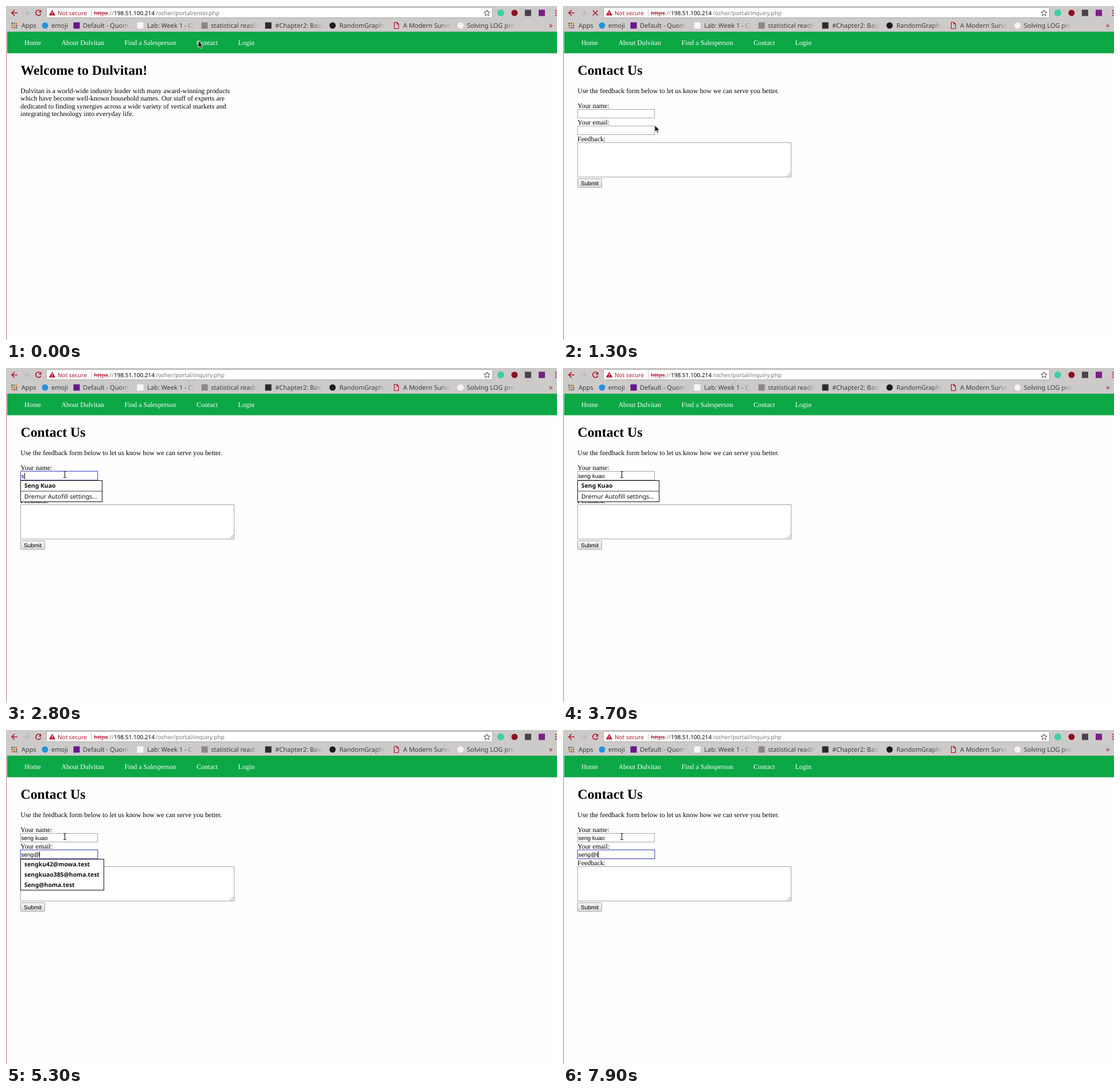
An HTML page that plays this animation: 960x583 px, repeating every 8 s.

```html
<!DOCTYPE html>
<html lang="en">
<head>
<meta charset="utf-8">
<title>Contact form</title>
<style>
  html, body { margin: 0; width: 100%; height: 100%; overflow: hidden; background: #fefefd; }
  svg { display: block; width: 960px; height: 583px; }
  text { white-space: pre; text-rendering: geometricPrecision; }
  .ui { font: 10px "Noto Sans", sans-serif; }
  .mark { font: 11px "Noto Sans", sans-serif; fill: #3c3c3c; }
  .page { font: 11.9px "Liberation Serif", serif; }
  .title { font: bold 23.8px "Liberation Serif", serif; }
  .field { font: 10px "Liberation Sans", sans-serif; }
  .item { font: bold 10.4px "Noto Sans", sans-serif; fill: #111; }
  .plain { font-weight: normal; font-size: 10.5px; }
  .red { fill: #b3142f; }
  .redline { fill: none; stroke: #b3142f; stroke-width: 1.6; }
  .box { fill: #fff; stroke: #a5a5a5; }
</style>
</head>
<body>
<svg id="stage" viewBox="0 0 960 583">
  <defs>
    <linearGradient id="fade"><stop offset="0" stop-color="#cdcbca" stop-opacity="0"/><stop offset="1" stop-color="#cdcbca"/></linearGradient>
    <linearGradient id="button" x2="0" y2="1"><stop offset="0" stop-color="#f6f6f6"/><stop offset="1" stop-color="#dcdcdc"/></linearGradient>
  </defs>
  <rect width="960" height="583" fill="#fefefd"/>

  <g id="home" class="page">
    <text class="title" x="25.5" y="120">Welcome to Dulvitan!</text>
    <text x="25.3" y="152">Dulvitan is a world-wide industry leader with many award-winning products</text>
    <text x="25.3" y="165.3">which have become well-known household names. Our staff of experts are</text>
    <text x="25.3" y="178.7">dedicated to finding synergies across a wide variety of vertical markets and</text>
    <text x="25.3" y="192">integrating technology into everyday life.</text>
  </g>

  <g id="contact" class="page">
    <text class="title" x="25.5" y="120">Contact Us</text>
    <text x="25.3" y="152">Use the feedback form below to let us know how we can serve you better.</text>
    <text x="25.3" y="177.5">Your name:</text>
    <text x="25.3" y="206.5">Your email:</text>
    <text x="25.3" y="235.5">Feedback:</text>
    <rect class="box" x="25.5" y="180.5" width="134" height="15"/>
    <rect class="box" x="25.5" y="209.5" width="134" height="15"/>
    <rect class="box" x="25.5" y="238.5" width="372" height="60"/>
    <path d="M390.5 297.5l6-6M393.5 297.5l3-3" stroke="#777" stroke-width=".8"/>
    <rect x="25.5" y="301.5" width="42" height="15" rx="1" fill="url(#button)" stroke="#a3a3a3"/>
    <text class="field" x="31" y="313">Submit</text>
    <rect id="ring" x="25.3" width="134.4" height="15.4" fill="none" stroke="#686dcc" stroke-width="1.4"/>
    <text id="name" class="field" x="26.5" y="191.5"></text>
    <text id="email" class="field" x="26.5" y="220.5"></text>
    <rect id="caret" width="1" height="11" fill="#000"/>
    <g id="popup"></g>
  </g>

  <rect y="45" width="960" height="37.5" fill="#0ca846"/>
  <g class="page" fill="#fff">
    <text x="32" y="68.3">Home</text>
    <text x="96.5" y="68.3">About Dulvitan</text>
    <text x="206.5" y="68.3">Find a Salesperson</text>
    <text x="332" y="68.3">Contact</text>
    <text x="404.5" y="68.3">Login</text>
  </g>

  <rect width="960" height="45" fill="#cdcbca"/>
  <path d="M0 44.5H960" stroke="#bab8b6"/>
  <path d="M20 12H10.5M15 7l-5 5 5 5" class="redline"/>
  <path d="M30 12h9.5M35 7l5 5-5 5" fill="none" stroke="#b9b7b5" stroke-width="1.6"/>
  <g id="reload"><path d="M60 9a4.6 4.6 0 1 0 .8 4.4" class="redline"/><path d="M61.5 6.5v5h-5z" class="red"/></g>
  <path id="stop" d="M52 8l8.500 8.5M60.5 8L52 16.5" class="redline"/>
  <rect x="70.5" y="2.5" width="777" height="18" rx="2" fill="#fff" stroke="#aaa8a6"/>
  <path d="M80.5 6.5l5.7 10H74.8z" class="red"/>
  <path d="M80.5 9.8v3.4M80.5 14.2v1.2" stroke="#fff" stroke-width="1.2"/>
  <g class="ui">
    <text x="90" y="15.7" class="red">Not secure</text>
    <path d="M148.5 6v12" stroke="#c6c6c6"/>
    <text x="153" y="15.7" class="red">https</text>
    <path d="M153 12.5h24.5" stroke="#b3142f"/>
    <text x="177.5" y="15.7" fill="#777">://</text>
    <text x="188" y="15.7">198.51.100.214</text>
    <text id="path" x="261" y="15.7" fill="#777"></text>
  </g>
  <path d="M838 7l1.5 3.4 3.7.3-2.8 2.4.9 3.7-3.3-2-3.3 2 .9-3.7-2.8-2.4 3.7-.3z" fill="none" stroke="#444"/>
  <circle cx="862" cy="12" r="6" fill="#3ecfa5"/>
  <circle cx="886" cy="12" r="5.5" fill="#8e1020"/>
  <rect x="904" y="6.5" width="11" height="11" fill="#4a434a"/>
  <rect x="928" y="6.5" width="11" height="11" fill="#7a1f86"/>
  <path d="M957 7h2v2h-2zM957 11h2v2h-2zM957 15h2v2h-2z" class="red"/>
  <g id="marks"></g>
  <text x="946" y="37.5" class="mark" style="font-size:13px;fill:#b3142f">»</text>
  <rect y="45" width="1" height="538" fill="#b9788c"/>
  <rect x="1" y="45" width="1" height="37.5" fill="#f6efef"/>

  <g id="status" class="ui">
    <path d="M0 567.5H240q3 0 3 3V583H0z" fill="#e6e4e2" stroke="#b5b3b1"/>
    <text x="4" y="579" fill="#555">https://198.51.100.214/ocher/portal/inquiry.php</text>
  </g>

  <g id="pointer">
    <path id="arrow" d="M0 0V11.5L2.7 9 4.6 13.2 6.6 12.3 4.8 8.2H8.3Z" fill="#111" stroke="#fff" stroke-width=".8"/>
    <path id="hand" d="M-1 0Q0-1.5 1 0V5L6 6Q8 6.5 7.5 9L6.5 13H0L-4 8Q-4 6-1 8Z" fill="#111" stroke="#fff" stroke-width=".8"/>
    <path id="beam" d="M-2.5-5.5H-.8L0-5 .8-5.5H2.5M0-5V5M-2.5 5.5H-.8L0 5 .8 5.5H2.5" fill="none" stroke="#222" stroke-width="1.2"/>
  </g>
</svg>
<script>
const LOOP = 8000;
const $ = id => document.getElementById(id);
const show = (id, on) => $(id).style.display = on ? "" : "none";
const setText = (id, value) => { if ($(id).textContent !== value) $(id).textContent = value; };

// Latest value whose start time has passed.
const at = (steps, t) => steps.reduce((value, [start, next]) => t >= start ? next : value, steps[0][1]);

function between(keys, t) {
  const i = keys.findIndex(key => key[0] > t);
  if (i < 0) return keys[keys.length - 1].slice(1);
  const [t0, x0, y0] = keys[i - 1], [t1, x1, y1] = keys[i];
  const k = (t - t0) / (t1 - t0);
  return [x0 + (x1 - x0) * k, y0 + (y1 - y0) * k];
}

// Bookmark: label, label x, icon centre, icon colour, fade end, round icon.
const bookmarks = [
  ["emoji", 79, 68, "#2393dc", 0, true],
  ["Default - Quomble", 134, 123, "#6a1690", 215],
  ["Lab: Week 1 - Cyc", 246, 234, "#f6f6f6", 327],
  ["statistical readin", 357, 346, "#8a8785", 438],
  ["#Chapter2: Basic", 469, 457, "#2c2a2a", 551],
  ["RandomGraphs", 581, 569, "#1b1a1c", 660, true],
  ["A Modern Survey", 692, 0, "", 773],
  ["Solving LOG prob", 803, 792, "#f6f2f2", 886, true]
];

function drawBookmarks() {
  let out = '<text class="mark" x="27" y="37.8">Apps</text>';
  const dots = ["#c5283d", "#2c9c58", "#d98a1f"];
  for (let i = 0; i < 9; i++) {
    const row = Math.floor(i / 3), column = i % 3;
    out += `<rect x="${9.5 + column * 3.8}" y="${29 + row * 3.8}" width="2.5" height="2.5" fill="${dots[(column + row) % 3]}"/>`;
  }
  for (const [label, x, , , end] of bookmarks) {
    out += `<text class="mark" x="${x}" y="37.8">${label}</text>`;
    if (end) out += `<rect x="${end - 17}" y="25" width="18" height="18" fill="url(#fade)"/><rect x="${end}" y="25" width="30" height="18" fill="#cdcbca"/>`;
  }
  for (const [, , cx, color, , round] of bookmarks)
    if (cx) out += `<rect x="${cx - 5.5}" y="28.5" width="11" height="11" rx="${round ? 5.5 : 0}" fill="${color}"/>`;
  out += '<path d="M676.5 28.5h4.5l3 3v8h-7.5zM681 28.5v3h3" fill="none" stroke="#b3142f" stroke-width="1.2"/>';
  $("marks").innerHTML = out;
}

const mails = ["sengku42@mowa.test", "sengkuao385@homa.test", "Seng@homa.test",
  "sengkuao.study52@homa.test", "sengk.office@mowa.test"];

function frame(x, y, width, height, stroke) {
  return `<rect x="${x}" y="${y}" width="${width}" height="${height}" fill="#fff" stroke="${stroke}"/>`;
}

function mailList(items, width, stroke = "#111") {
  return frame(25.5, 225.5, width, items.length * 18, stroke) +
    items.map((mail, i) => `<text class="item" x="32" y="${238.3 + i * 18}">${mail}</text>`).join("");
}

const nameList = frame(25.5, 196.5, 142, 37, "#111") +
  '<path d="M26 215H167" stroke="#111" stroke-width=".8"/>' +
  '<text class="item" x="32" y="209.3">Seng Kuao</text>' +
  '<text class="item plain" x="32" y="228">Dremur Autofill settings...</text>';

const popups = [
  [0, ""], [2800, nameList], [3800, ""],
  [4700, mailList(mails, 167)], [4900, mailList(mails.slice(0, 3), 145)], [5500, ""],
  [7200, mailList([mails[2]], 135, "#a3a3a3")], [7400, ""]
];
const nameTyping = [
  [0, ""], [2800, "s"], [2900, "sen"], [3100, "seng"], [3200, "seng "],
  [3400, "seng k"], [3500, "seng ku"], [3600, "seng kuao"]
];
const emailTyping = [
  [0, ""], [4700, "s"], [4800, "sen"], [4900, "seng"], [5300, "seng@"],
  [6600, "seng@h"], [7200, "seng@t"], [7500, "seng@te"], [7900, "seng@t"]
];
const focus = [[0, ""], [2300, "name"], [3700, ""], [3800, "email"]];
const caretOn = [[0, true], [4300, false], [4700, true], [5900, false], [6500, true]];
const pointerPath = [
  [0, 335, 61], [200, 345, 63], [500, 346, 64], [800, 177.5, 202], [900, 170, 206],
  [1000, 162.5, 209.5], [1200, 162.5, 209.5], [1500, 155, 206], [1600, 155, 206],
  [2100, 102.5, 187], [2400, 102.5, 187], [2500, 102.5, 186]
];

const measure = document.createElement("canvas").getContext("2d");
measure.font = '10px "Liberation Sans", sans-serif';

let popupNow = "";

function render(time) {
  const t = Math.floor(time / 100) * 100;
  show("home", t < 1200);
  show("contact", t >= 1200);
  const loading = t >= 400 && t < 1400;
  show("stop", loading);
  show("reload", !loading);
  show("status", t >= 200 && t < 600);
  setText("path", "/ocher/portal/" + (t < 1000 ? "enter" : "inquiry") + ".php");

  const values = { name: at(nameTyping, t), email: at(emailTyping, t) };
  setText("name", values.name);
  setText("email", values.email);

  const active = at(focus, t);
  const top = active === "name" ? 180.3 : 209.3;
  show("ring", active);
  show("caret", active && at(caretOn, t));
  $("ring").setAttribute("y", top);
  if (active) {
    $("caret").setAttribute("x", Math.round(26.6 + measure.measureText(values[active]).width));
    $("caret").setAttribute("y", Math.round(top) + 3);
  }

  const popup = at(popups, t);
  if (popup !== popupNow) $("popup").innerHTML = popupNow = popup;

  const [x, y] = between(pointerPath, t);
  const beam = t >= 1700 && y < 197, hand = t >= 200 && t < 600;
  $("pointer").setAttribute("transform", `translate(${x} ${y})`);
  show("beam", beam);
  show("hand", hand);
  show("arrow", !beam && !hand);
}

drawBookmarks();
const begin = performance.now();
function tick() {
  render((performance.now() - begin) % LOOP);
  requestAnimationFrame(tick);
}
tick();
</script>
</body>
</html>
```
